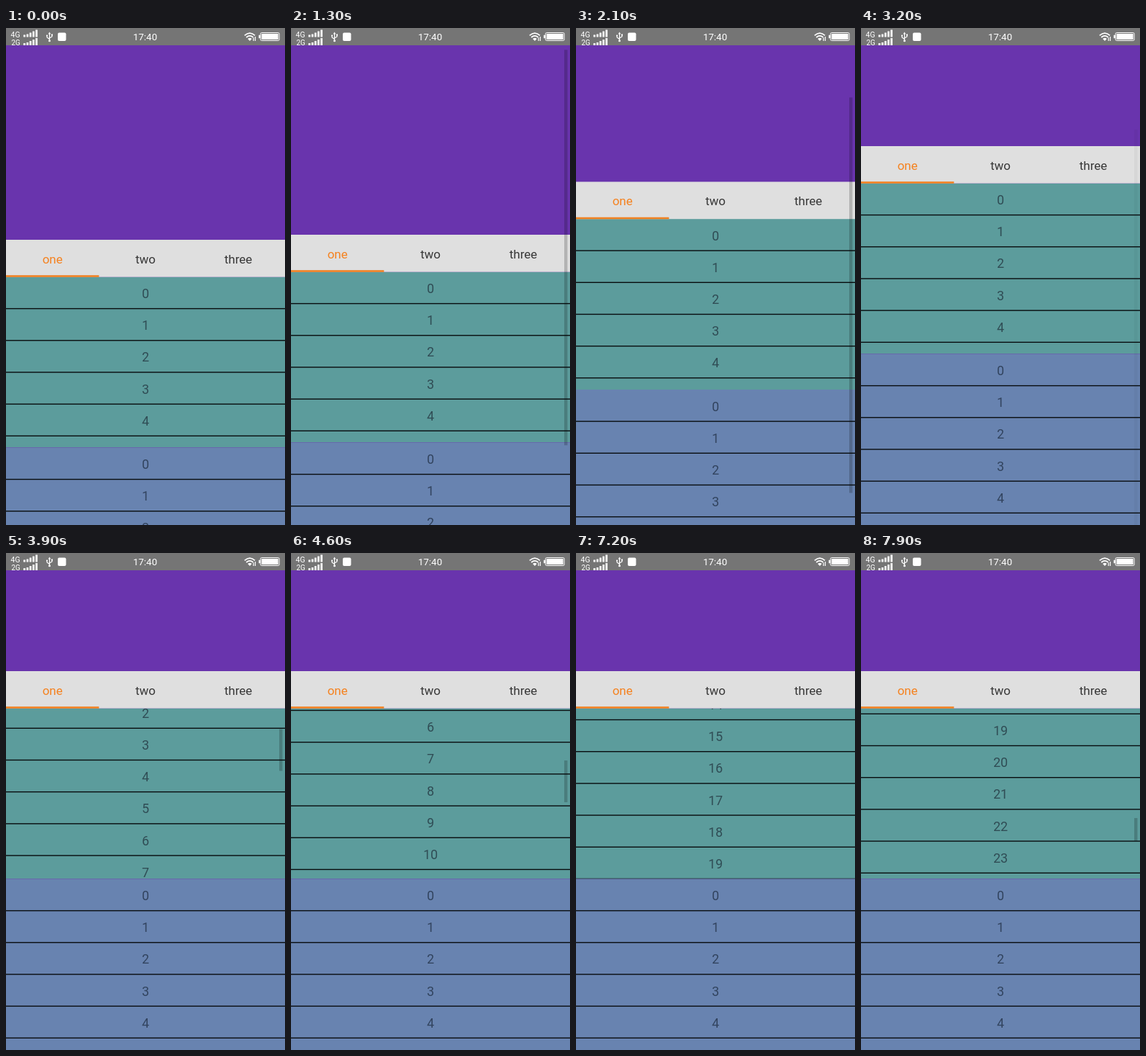
Recreate the animation shown at these times as an HTML page. Size 388 px wide and 690 px high, loop 8000 ms.

```html
<!DOCTYPE html>
<html lang="en">
<head>
<meta charset="utf-8">
<title>Nested scrolling</title>
<style>
  html, body { margin: 0; width: 100%; height: 100%; overflow: hidden; background: #6883b0; }
  svg { display: block; width: 100vw; height: 100vh; }
  text { font-family: Roboto, Arial, sans-serif; text-anchor: middle; }
  .tab { font-size: 17px; fill: #383838; }
  .row { font-size: 18px; fill: #304d55; }
  .blue .row { fill: #32445f; }
  .net { font-size: 10.5px; text-anchor: start; fill: #fff; }
</style>
</head>
<body>
<svg id="stage" viewBox="0 0 388 690" xmlns="http://www.w3.org/2000/svg">
  <defs>
    <clipPath id="listClip"><rect width="388" height="237"/></clipPath>
    <clipPath id="barClip"><rect width="388" height="24"/></clipPath>
  </defs>
  <rect width="388" height="690" fill="#6934ad"/>
  <g id="page">
    <g transform="translate(0 345.5)" clip-path="url(#listClip)">
      <rect width="388" height="237" fill="#5c9c9c"/>
      <g id="rows"></g>
      <rect id="innerThumb" x="380" width="4.5"/>
    </g>
    <g class="blue" transform="translate(0 582.5)">
      <rect width="388" height="260" fill="#6883b0"/>
      <g id="rows2"></g>
    </g>
    <g transform="translate(0 294)">
      <rect width="388" height="51.7" fill="#dfdfdf"/>
      <text class="tab" x="64.7" y="32.6" style="fill:#f5821f">one</text>
      <text class="tab" x="194" y="32.6">two</text>
      <text class="tab" x="323" y="32.6">three</text>
      <rect y="49.2" width="129.3" height="2.6" fill="#f08222"/>
    </g>
  </g>
  <rect id="outerThumb" x="380" width="4.5" height="549"/>
  <g clip-path="url(#barClip)">
    <rect width="388" height="24" fill="#757575"/>
    <text class="net" x="6.5" y="12.5">4G</text>
    <text class="net" x="7.5" y="23.8" style="font-size:10px">2G</text>
    <g id="signal" fill="#fff"></g>
    <g stroke="#fff" fill="none" stroke-width="1.2">
      <path d="M60.5 7V18M60.5 15.5L57 13V10.5M60.5 14L64 12V9.5"/>
      <path d="M58.7 8.5L60.5 5.5L62.3 8.5Z" fill="#fff" stroke="none"/>
      <circle cx="60.5" cy="17.7" r="1.5" fill="#fff" stroke="none"/>
      <circle cx="57" cy="10.5" r="1.1" fill="#fff" stroke="none"/>
      <path d="M63 8.5h2v2h-2z" fill="#fff" stroke="none"/>
    </g>
    <rect x="72" y="6.5" width="11.5" height="11.5" rx="2" fill="#fff"/>
    <text x="193.5" y="17.4" fill="#fff" font-size="13.4">17:40</text>
    <g fill="none" stroke="#fff" stroke-width="1.7">
      <path d="M331.8 10.3Q339 3.8 346.2 10.3M334.2 13Q339 8.6 343.8 13"/>
      <path d="M336.2 15Q339 12.6 341.8 15L339 18Z" fill="#fff" stroke="none"/>
      <path d="M344.2 13.5V18M346.6 12V18" stroke-width="1.2"/>
    </g>
    <rect x="354" y="6.5" width="26" height="11" rx="1.5" fill="none" stroke="#fff" stroke-width="1"/>
    <rect x="355.5" y="8" width="23" height="8" fill="#fff"/>
    <rect x="351.5" y="9.8" width="2.2" height="4.4" fill="#fff"/>
  </g>
</svg>
<script>
const LOOP = 8000, STEP = 100, PITCH = 44.18, VIEW = 237;
const FIRST_END = 20 * PITCH - VIEW;
const $ = id => document.getElementById(id);

// [time, offset] pairs
const outer = [[1200, 0], [1300, 7], [1700, 42], [2500, 119], [2700, 130]];
const inner = [[3200, 0], [3300, 20], [3500, 78], [3600, 92], [3800, 92], [4100, 130],
  [4200, 130], [4600, 262], [4900, 330], [5000, 330], [5200, 375], [5800, 569],
  [6100, 634], [6300, FIRST_END], [7300, FIRST_END], [7900, 831.5]];

function at(keys, t) {
  if (t <= keys[0][0]) return keys[0][1];
  for (let i = 1; i < keys.length; i++) {
    const [t0, v0] = keys[i - 1], [t1, v1] = keys[i];
    if (t <= t1) return v0 + (v1 - v0) * (t - t0) / (t1 - t0);
  }
  return keys[keys.length - 1][1];
}

// Scrollbars wait 300 ms after scrolling, then fade for 250 ms.
function barAlpha(t, spans) {
  let a = 0;
  for (const [from, to] of spans)
    if (t > from) a = Math.max(a, Math.min(1, 1 - (t - to - 300) / 250));
  return a * 0.2;
}

function rows(count) {
  let out = "";
  for (let i = 0; i < count; i++) {
    const y = i * PITCH;
    out += `<text class="row" x="194" y="${y + 29.6}">${i}</text>` +
      `<rect y="${y + 43.4}" width="388" height="1.4" fill="#080c0e"/>`;
  }
  return out;
}

function signal(base) {
  return [3, 4, 6, 8, 10].map((h, i) =>
    `<rect x="${24.3 + i * 4.2}" y="${base - h}" width="2.7" height="${h}"/>`).join("");
}

function draw(t) {
  const s = at(outer, t), l = at(inner, t), more = t > 7300;
  $("page").setAttribute("transform", `translate(0 ${-s})`);
  $("rows").setAttribute("transform", `translate(0 ${-l})`);
  const big = $("outerThumb"), small = $("innerThumb");
  big.setAttribute("y", 24 + 117 * s / 130);
  big.setAttribute("opacity", barAlpha(t, [[1200, 2700]]));
  const len = more ? 32 : 58, range = more ? 1118 : FIRST_END;
  small.setAttribute("y", (VIEW - len) * l / range);
  small.setAttribute("height", len);
  small.setAttribute("opacity", barAlpha(t, [[3200, 3600], [3800, 4100], [4200, 6300], [7300, 8000]]));
}

$("rows").innerHTML = rows(30);
$("rows2").innerHTML = rows(6);
$("signal").innerHTML = signal(12.5) + signal(24);

const start = performance.now();
function tick() {
  const t = (performance.now() - start) % LOOP;
  draw(Math.floor(t / STEP) * STEP);
  requestAnimationFrame(tick);
}
tick();
</script>
</body>
</html>
```
